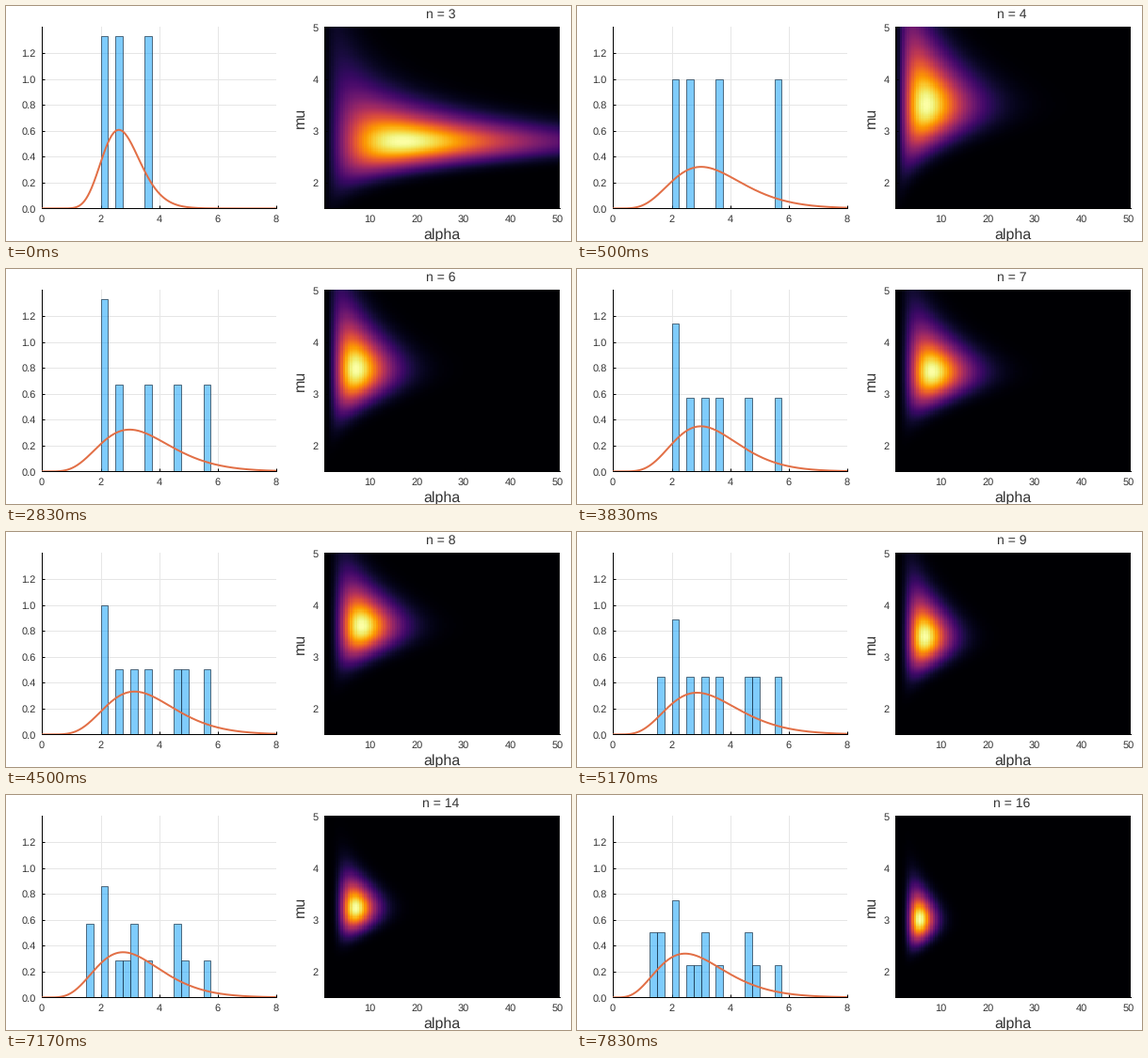
A matplotlib script that plays this animation: 600 by 250 pixels, repeating every 8000 ms.

```python
import math

import matplotlib.pyplot as plt
import numpy as np
from matplotlib.animation import FuncAnimation

W, H = 600, 250
TOP, BOTTOM = 22.4, 215.4
LOOP_MS, STEP_MS = 8000, 50
PT = 0.72  # points per pixel at 100 dpi
INK = "#333333"

plt.rcParams["font.family"] = "Liberation Sans"
plt.rcParams["text.hinting"] = "none"

# Observations in order of arrival; the first three are present at the start.
samples = np.array([2.05, 2.6, 3.7, 5.65, 2.2, 4.65, 3.1, 4.8,
                    1.7, 1.7, 3.2, 2.85, 4.7, 2.2, 1.42, 1.45])
arrivals = np.array([500, 1830, 2830, 3830, 4500, 5170, 5830,
                     6170, 6500, 6830, 7170, 7500, 7830])

alphas = np.arange(0.5, 50.1, 0.5)
mus = np.linspace(1.5, 5, 176)
A, M = np.meshgrid(alphas, mus)
LOG_GAMMA = np.array([math.lgamma(a) for a in alphas])
bins = np.arange(0, 8.1, 0.25)
xs = np.linspace(0, 8, 400)


def posterior(data):
    """Gamma likelihood over the (alpha, mu) grid, scaled to a peak of one."""
    log_p = (len(data) * (A * np.log(A / M) - LOG_GAMMA)
             + (A - 1) * np.log(data).sum() - A * data.sum() / M)
    return np.exp(log_p - log_p.max())


def gamma_pdf(x, alpha, mu):
    rate = alpha / mu
    scale = math.exp(alpha * math.log(rate) - math.lgamma(alpha))
    return scale * x ** (alpha - 1) * np.exp(-rate * x)


def summarize(n):
    data = samples[:n]
    density = np.histogram(data, bins)[0] / (n * 0.25)
    grid = posterior(data)
    row, col = np.unravel_index(grid.argmax(), grid.shape)
    return density, gamma_pdf(xs, alphas[col], mus[row]), grid


summaries = {n: summarize(n) for n in range(3, len(samples) + 1)}

fig = plt.figure(figsize=(W / 100, H / 100), dpi=100, facecolor="white")


def label(x, y, text, size=11, **kw):
    kw = {"ha": "center", "va": "baseline", "color": INK, **kw}
    return fig.text(x / W, 1 - y / H, text, fontsize=size * PT, **kw)


def make_axes(left, right, xlim, ylim, xticks, yticks, y_format):
    ax = fig.add_axes([left / W, 1 - BOTTOM / H,
                       (right - left) / W, (BOTTOM - TOP) / H])
    ax.set(xlim=xlim, ylim=ylim, xticks=xticks, yticks=yticks)
    ax.set_axisbelow(True)
    ax.tick_params(direction="in", length=3 * PT, width=PT,
                   labelbottom=False, labelleft=False)
    for side in ("top", "right"):
        ax.spines[side].set_visible(False)
    for side in ("left", "bottom"):
        ax.spines[side].set(linewidth=PT, zorder=1.5)
    for t in xticks:
        x = left + (right - left) * (t - xlim[0]) / (xlim[1] - xlim[0])
        label(x - 0.5, 229.5, f"{t:d}")
    for t in yticks:
        y = BOTTOM - (BOTTOM - TOP) * (t - ylim[0]) / (ylim[1] - ylim[0])
        label(left - 6.5, y + 4, format(t, y_format), ha="right")
    return ax


hist_ax = make_axes(38.4, 287.4, (0, 8), (0, 1.4), range(0, 9, 2),
                    np.arange(7) * 0.2, ".1f")
hist_ax.grid(color="#e6e6e6", linewidth=PT)
bars = hist_ax.bar(bins[:-1], np.zeros(len(bins) - 1), 0.25, align="edge",
                   facecolor=(0, 0.604, 0.98, 0.5),
                   edgecolor=(0.1, 0.2, 0.28, 0.85), linewidth=0.8 * PT, zorder=2)
curve, = hist_ax.plot(xs, 0 * xs, color="#e26f46", linewidth=2 * PT, zorder=3)
hist_ax.set(xlim=(0, 8), ylim=(0, 1.4))

extent = (0.25, 50.25, 1.5, 5)
heat_ax = make_axes(338.4, 587.6, extent[:2], extent[2:], range(10, 51, 10),
                    range(2, 6), "d")
heat = heat_ax.imshow(summaries[3][2], cmap="inferno", vmin=0, vmax=1,
                      origin="lower", extent=extent, aspect="auto",
                      interpolation="nearest")
title = label(462, 13, "", 14)
label(462.5, 248, "alpha", 16)
label(320.5, 118.5, "mu", 16, rotation=90, ha="right", va="center")


def update(frame):
    # Arrivals are rounded down to the frame step.
    n = 3 + int(np.sum(frame * STEP_MS + 30 >= arrivals))
    density, pdf, grid = summaries[n]
    for bar, height in zip(bars, density):
        bar.set_height(height)
        bar.set_visible(height > 0)
    curve.set_ydata(pdf)
    heat.set_data(grid)
    title.set_text(f"n = {n}")
    return [*bars, curve, heat, title]


anim = FuncAnimation(fig, update, frames=LOOP_MS // STEP_MS,
                     interval=STEP_MS, repeat=True, repeat_delay=0)
plt.show()
```
